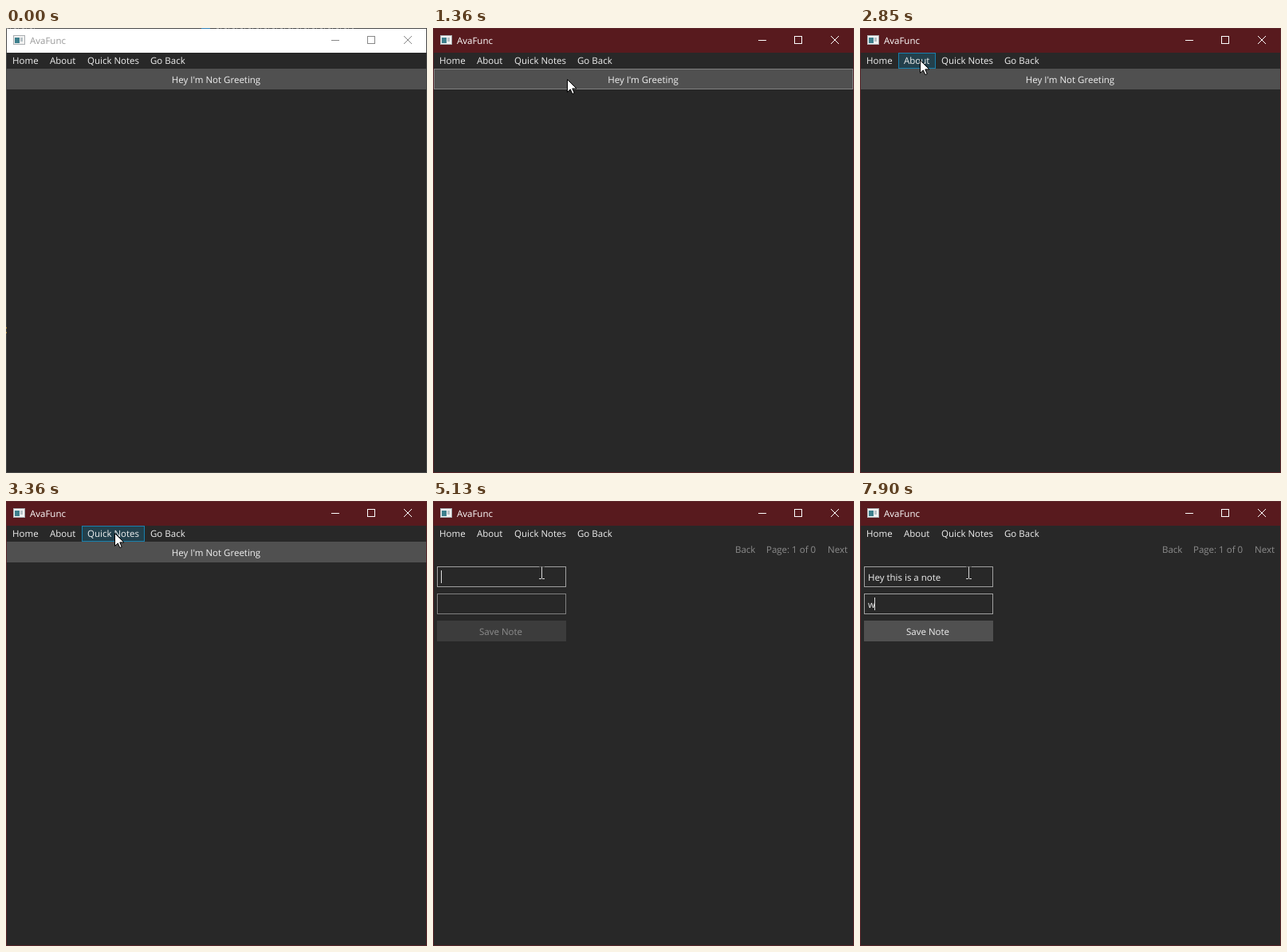
These frames come from a looping animation (528x558 px, 8 s). An HTML page:

```html
<!DOCTYPE html>
<html lang="en">
<head>
<meta charset="utf-8">
<title>AvaFunc</title>
<style>
  html, body { margin: 0; width: 100%; height: 100%; overflow: hidden; background: #282828; }
  svg { display: block; width: 528px; height: 558px; }
  text {
    font: 11.5px "Open Sans", "Noto Sans", sans-serif;
    fill: #f0f0f0; white-space: pre; text-rendering: geometricPrecision;
  }
  rect, .crisp { shape-rendering: crispEdges; }
  .mid { text-anchor: middle; }
  .dim { fill: #8c8c8c; }
  .box { fill: none; stroke: #808080; }
  .box.lit { stroke: #a0a0a0; }
  #bar { fill: #fff; }
  #frame { fill: none; stroke: #484848; }
  #title { fill: #999; }
  #controls { fill: none; stroke: #888; }
  .active #bar { fill: #581a1e; }
  .active #frame { stroke: #5a272b; }
  .active #title { fill: #fff; }
  .active #controls { stroke: #fff; }
  .active #behind { display: none; }
  #toggle { fill: #505050; }
  #toggle.down { fill: #686868; }
  #save { opacity: .5; }
  #save.on { opacity: 1; }
  #beam { fill: #fff; mix-blend-mode: difference; }
</style>
</head>
<body>
<svg id="win" viewBox="0 0 528 558">
  <rect width="528" height="558" fill="#282828"/>
  <rect id="bar" x="1" y="1" width="526" height="30"/>
  <rect id="frame" x=".5" y=".5" width="527" height="557"/>
  <g id="behind" class="crisp">
    <path d="M0 .5H40M264 .5H436" stroke="#8c8c8c" stroke-dasharray="3 2 1 4"/>
    <path d="M245 .5h11" stroke="#2f7fb5"/>
    <path d="M.5 375v2M.5 381v2" stroke="#b08a3c"/>
  </g>
  <g>
    <rect x="9" y="9" width="15" height="12" fill="#a9adb0"/>
    <rect x="10" y="10" width="13" height="10" fill="#f2f2f2"/>
    <rect x="11" y="12" width="6" height="7" fill="#3d7f8c"/>
    <rect x="18" y="12" width="3" height="5" fill="#b9c4c8"/>
  </g>
  <text id="title" x="30" y="20">AvaFunc</text>
  <g id="controls">
    <path class="crisp" d="M408 15.5h10M453.5 10.5h9v9h-9z"/>
    <path d="M499 10l10 10m0-10l-10 10"/>
  </g>

  <rect id="hot" y="31.5" height="19" fill="#23404c" stroke="#1880ad"/>
  <text x="8" y="45">Home</text>
  <text x="55" y="45">About</text>
  <text x="102" y="45">Quick Notes</text>
  <text x="181" y="45">Go Back</text>

  <g id="home">
    <rect id="toggle" x="1" y="51" width="526" height="26"/>
    <rect id="ring" class="box" x="1.5" y="51.5" width="525" height="25"/>
    <text id="greet" class="mid" x="263.5" y="69"></text>
  </g>

  <g id="notes">
    <text class="dim" x="379" y="65">Back</text>
    <text class="dim" x="418" y="65">Page: 1 of 0</text>
    <text class="dim" x="495" y="65">Next</text>
    <rect id="box1" class="box" x="5.5" y="82.5" width="161" height="25"/>
    <rect id="box2" class="box" x="5.5" y="116.5" width="161" height="25"/>
    <text id="text1" x="10" y="100"></text>
    <text id="text2" x="10" y="134"></text>
    <rect id="caret" width="1" height="16" fill="#dedede"/>
    <g id="save">
      <rect x="5" y="150" width="162" height="26" fill="#505050"/>
      <text class="mid" x="85" y="168">Save Note</text>
    </g>
  </g>

  <path id="arrow" d="M.5 .5V16.5L4.3 12.9L6.8 18.6L9.2 17.6L6.8 11.9H12z" fill="#fff" stroke="#000"/>
  <path id="beam" class="crisp" d="M-3-8h3v1h-3zM1-8h3v1h-3zM0-7h1V7h-1zM-3 7h3v1h-3zM1 7h3v1h-3z"/>
</svg>
<script>
const LOOP = 8000, HOP = 50, KEY = 76, BLINK = 510;
const $ = id => document.getElementById(id);

// Pointer moves: start, end, x, y reached
const moves = [
  [250, 720, 182, 23],
  [770, 950, 170, 62],
  [1080, 1130, 168, 64],
  [2220, 2570, 75, 40],
  [2900, 3100, 108, 28],
  [3100, 3250, 136, 40],
  [3690, 3870, 136, 85],
  [3970, 4200, 136, 90]
];

// Typing bursts: start, letters
const bursts = [[5260, 1], [5410, 5], [5950, 6], [6560, 2], [6790, 3], [7070, 1]];
const note = "Hey this is a note";

// Edges of the menu items
const edges = [1, 48, 95, 174, 231];

const clamp = (v, a, b) => Math.min(b, Math.max(a, v));
const within = (v, a, b) => v >= a && v < b;
const show = (id, on) => { $(id).style.display = on ? "" : "none"; };
const flag = (id, name, on) => $(id).classList.toggle(name, on);
const setText = (id, s) => { if ($(id).textContent !== s) $(id).textContent = s; };

// Each move eases out in hops; it begins below the window
function pointer(t) {
  let x = 218, y = 653;
  for (const [from, to, x1, y1] of moves) {
    if (t < from) break;
    const k = Math.min(1, (Math.floor((t - from) / HOP) + 1) * HOP / (to - from));
    const e = k * (2 - k);
    x += (x1 - x) * e;
    y += (y1 - y) * e;
  }
  return [Math.round(x), Math.round(y)];
}

const typedBy = t => bursts.reduce(
  (sum, [at, n]) => sum + clamp(Math.floor((t - at) / KEY) + 1, 0, n), 0);

function draw(t) {
  const [x, y] = pointer(t);
  const onNotes = t >= 3410, second = t >= 7350;
  const overBox = onNotes && within(x, 5, 167) && within(y, 82, 108);

  flag("win", "active", t >= 1310);
  show("home", !onNotes);
  show("notes", onNotes);

  const i = edges.findIndex((a, k) => within(x, a, edges[k + 1]));
  const overMenu = within(y, 31, 51) && i >= 0;
  show("hot", overMenu);
  if (overMenu) {
    $("hot").setAttribute("x", edges[i] + .5);
    $("hot").setAttribute("width", edges[i + 1] - edges[i] - 1);
  }

  show("ring", within(y, 51, 77));
  flag("toggle", "down", [1310, 2110].some(c => within(t, c, c + HOP)));
  setText("greet", within(t, 1360, 2160) ? "Hey I'm Greeting" : "Hey I'm Not Greeting");

  const typed = typedBy(t);
  const word = t >= 7900 ? "w" : "";
  setText("text1", note.slice(0, typed));
  setText("text2", word);
  flag("save", "on", typed > 2);
  flag("box1", "lit", overBox || within(t, 4100, 7350));
  flag("box2", "lit", second);

  // The caret blinks while its field is empty and stays lit while typing
  const busy = second ? word : typed;
  const lit = t >= 4100 && (busy || Math.floor((t - (second ? 7350 : 4100)) / BLINK) % 2 === 0);
  show("caret", lit);
  if (lit) {
    const w = $(second ? "text2" : "text1").getComputedTextLength();
    $("caret").setAttribute("x", Math.floor(10 + w));
    $("caret").setAttribute("y", second ? 121 : 87);
  }

  show("arrow", !overBox);
  show("beam", overBox);
  $(overBox ? "beam" : "arrow").setAttribute("transform", `translate(${x} ${y})`);
}

const start = performance.now();
function tick() {
  draw((performance.now() - start) % LOOP);
  requestAnimationFrame(tick);
}
tick();
</script>
</body>
</html>
```
